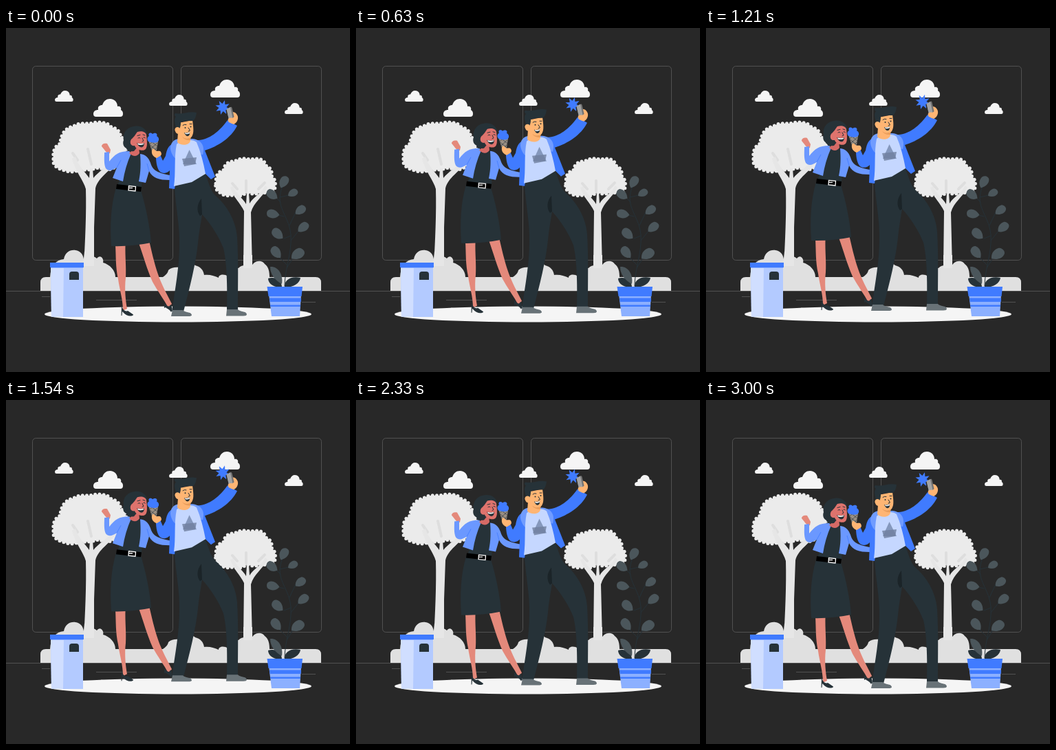
Animation of 500 by 500 pixels, one loop 3.04 s. Source, as an HTML page:

```html
<!DOCTYPE html>
<html lang="en">
<head>
<meta charset="utf-8">
<title>Selfie in the park</title>
<style>
html, body { margin: 0; width: 100%; height: 100%; overflow: hidden; background: #282828; }
svg { display: block; width: 100vw; height: 100vh; }
.line { fill: none; stroke: #5c5c5c; stroke-width: .8; }
.crown { fill: #ebebeb; stroke: #ebebeb; stroke-width: 5; stroke-linecap: round; stroke-dasharray: 0 6.2; }
.vein { fill: none; stroke: #dedede; stroke-width: 4; stroke-linecap: round; }
.trunk { fill: #e6e6e6; }
.dark { fill: #263238; }
.blue { fill: #407bff; }
.jacket { fill: #6b98ff; }
.skin { fill: #ffb573; }
.rose { fill: #e4897b; }
.ink { fill: none; stroke: #263238; stroke-linecap: round; stroke-width: 1; }
</style>
</head>
<body>
<svg viewBox="0 0 500 500">
  <defs>
    <path id="cloud" fill="#f5f5f5" d="M4 26Q0 26 0 22C0 18 3 16 7 16C6 11 9 9 13 9C15 3 19 0 24 0C31 0 35 5 35 11C39 10 41 13 40 16C43 18 43 20 43 22Q43 26 39 26Z"/>
    <path id="leaf" d="M-10 0C-6 -7 1 -8 6 -6C10 -4 11 3 7 5C2 8 -5 6 -10 0Z"/>
  </defs>

  <g class="line">
    <rect x="38.5" y="55.5" width="204" height="282" rx="5"/>
    <rect x="254.5" y="55.5" width="204" height="282" rx="5"/>
    <path d="M0 382.5H500M52 390.5H64M131 395.5H190M430 398.5H450"/>
  </g>
  <g id="clouds"></g>

  <path class="crown" d="M69 190C68 180 70 172 79 168C79 155 87 144 98 143C105 137 116 139 122 139C134 135 149 137 153 144C163 146 167 153 166 158C176 162 176 175 174 183C177 193 168 202 160 201C151 209 142 205 134 203C124 207 112 206 105 207C96 211 87 208 82 206C73 204 67 198 69 190Z"/>
  <path class="vein" d="M97 182L104 192M163 186L151 195M119 176L124 198"/>
  <path class="trunk" d="M113 348C115 310 117 270 116 234C113 222 100 207 96 190L101 187C106 202 115 209 121 218L122 204H126L127 218C134 209 146 203 157 190L161 193C151 209 134 217 130 233L128 290V348Z"/>
  <path class="crown" d="M305 226C305 217 306 209 316 207C317 199 323 193 332 194C340 188 350 190 356 191C367 188 376 191 378 200C386 203 387 211 386 215C393 220 392 231 390 235C386 243 376 239 370 239C363 243 356 241 350 239C343 245 335 245 330 243C321 245 313 243 310 238C305 236 304 231 305 226Z"/>
  <path class="vein" d="M329 226L336 234M376 225L367 234M349 222V237"/>
  <path class="trunk" d="M345 349L346 266C341 255 331 247 326 232L330 230C336 243 344 247 349 256L350 240H353L354 255C360 245 370 242 377 229L380 232C373 246 360 253 356 268L358 349Z"/>
  <path fill="#e0e0e0" d="M50 382V370Q50 362 58 362H64C65 346 72 337 84 336C86 326 93 322 101 323C108 324 112 329 113 336C118 331 127 330 132 335C137 328 143 336 141 341C151 344 159 352 159 362H228C232 359 235 357 236 352C241 347 250 347 257 349C257 342 270 340 275 345C283 347 287 352 288 359C296 358 302 360 309 363C309 358 317 357 323 361C324 352 331 348 338 349C342 344 351 344 356 348C360 338 371 336 376 343C382 347 383 355 383 362H450Q458 362 458 370V382Z"/>
  <path class="trunk" d="M112 346L114 325H128V346ZM345 349V330H358V349Z"/>
  <ellipse cx="250" cy="416" rx="194" ry="11.5" fill="#f5f5f5"/>

  <g>
    <path fill="#b3caff" d="M65 347H112V420H66Z"/>
    <path fill="#d0deff" d="M65 347H84L83 420H66Z"/>
    <path fill="#8cb0ff" d="M65 347H112V349H65Z"/>
    <path class="blue" d="M64 341H113V348H64Z"/>
    <path class="dark" d="M92 366V358Q92 354 96 354H102Q106 354 106 358V366Z"/>
  </g>

  <path class="ink" d="M405 375C405 350 416 327 414 300C412 278 397 264 398 246Q399 236 402 230M398 246L411 243M399 253L393 247M404 274L396 272M412 287L421 268M414 302L404 306M414 309L426 294M409 345L398 334M408 349L416 336"/>
  <g id="leaves" fill="#4b565b"></g>
  <path class="dark" d="M405 377C404 367 413 360 428 363C427 371 418 377 405 377ZM401 376C400 365 390 361 381 364C381 372 390 378 401 376Z"/>
  <path fill="#4b565b" d="M384 347C395 346 403 357 401 372C391 367 384 358 384 347Z"/>
  <path fill="#8cb0ff" d="M382 387H429L427 419H386Z"/>
  <path class="blue" d="M379.500 376H431L429.500 390H381.500ZM383 392.500H429L428.700 398H383.500ZM384 402.500H428.200L428 405H384.300Z"/>

  <g id="people">
    <!-- woman -->
    <path class="rose" d="M159 315H173.500C173 332 175 349 174 363C172 380 174 397 176 408L170 411C170 395 165 380 163 365C159 347 160 332 159 315ZM193 313L208 309C212 326 215 340 221 358C226 373 235 389 241 401L236 407C230 395 220 382 213 369C205 351 200 332 193 313Z"/>
    <path class="dark" d="M168 404C170 409 173 413 177 411L185 416.500Q185 418.500 180 418.500C174 418 171 414 169 412L168.500 418H167.500ZM230 400C234 404 237 407 239 402C242 405 242 411 240 413C238 409 234 408 232 406L230 407Z"/>
    <path class="dark" d="M160 232L196 236C203 259 209 287 211 312Q182 318 153 317C151 288 152 259 160 232Z"/>
    <path class="dark" d="M177 183L194 183L200 197L197 233L162 230Z"/>
    <path class="rose" d="M149 183C146 181 143 177 139 172C139 168 144 167 147 168L152 177L151 182Z"/>
    <path class="jacket" d="M143 181L150 180L150 194C158 184 164 179 179 179L182 182C176 196 172 209 170 223L155 218L161 203C155 207 149 209 145 204C142 198 143 188 143 181Z"/>
    <path class="jacket" d="M195 183C203 184 207 188 210 196C213 206 218 210 238 214V221C222 221 213 218 208 208L203 225L193 223C196 209 196 197 195 183Z"/>
    <path fill="none" stroke="#407bff" stroke-width=".8" d="M161 203L167 192M208 208L205 197"/>
    <path fill="#d56a66" d="M183 169L193 172L194 182Q188 190 179 182L183 178Z"/>
    <path class="dark" d="M186 179C178 180 176 178 175 175C171 173 169 168 171 163C169 153 176 144 186 143C195 141 204 146 205 154L195 168Z"/>
    <path fill="#de736d" d="M184 160C188 156 189 153 191 151C197 149 203 151 204 155C205 164 206 172 203 176C199 180 189 177 187 171C182 172 180 168 181 164C182 161 183 161 184 160Z"/>
    <path class="ink" d="M191 156.500L195 155.500M199 155L202 156M192 160Q194 158.500 195 160M200 159Q201.500 158 202.500 160M198 160L200 164L198 165" stroke-width=".8"/>
    <path class="dark" d="M190 167Q196 169 201 167C201 174 195 177 190 167Z"/>
    <path fill="#fff" d="M191 167.500Q196 169 200.500 167.500L200 169Q196 170.500 192 169.500Z"/>
    <path fill="#000" d="M161 227L197 231L196 238L160 234Z"/>
    <path fill="none" stroke="#fff" stroke-width="1.300" d="M178.500 229.500L188.500 230.500L188 237L178 236ZM179 232.500H184"/>

    <!-- man -->
    <path class="dark" d="M245 231L290 213C295 225 297 236 304 243C321 258 334 279 336 304C338 337 337 374 337 410H321C322 375 321 341 316 320C309 302 297 284 285 271C283 285 280 299 279 313C276 342 267 378 258 412H241C246 379 252 346 252 316C253 287 246 258 245 231Z"/>
    <path fill="#1b2428" d="M284 248C277 256 277 267 282 273L285 271Z"/>
    <path fill="#687277" d="M242 410H257C260 414 269 412 270 417Q270 419 265 419H240ZM321 409H337C340 413 349 411 350 416Q350 418.500 345 418.500H320Z"/>
    <path class="blue" d="M247 168C237 168 234 175 232 186L228 193L224 184L218 187C218 196 220 206 224 209C230 213 235 210 238 207L237 233L245 234L252 190ZM275 163C290 164 306 156 322 134L336 142C327 160 308 172 289 178L304 216L298 220L289 211L277 180Z"/>
    <path fill="#709cff" d="M253 161C244 161 239 167 239 175C240 184 245 189 248 191L270 182L286 184C290 171 283 162 271 161Z"/>
    <path fill="#c5d7ff" d="M248 169C253 163 270 160 277 166C283 180 287 196 290 212L270 224L244 230C247 211 244 189 248 169Z"/>
    <path fill="#8598bd" d="M266.500 177L277 198H257Z"/>
    <path fill="#6f7f9f" fill-opacity=".8" d="M256 190L277 188L275 198L259 201Z"/>
    <path class="skin" d="M250 152L270 154L268 162C269 171 254 172 249 166Z"/>
    <path fill="#e99d5b" d="M256 158Q262 163 268 159L268 163Q260 164 256 158Z"/>
    <path class="skin" d="M251 138L271 134C272 143 274 152 270 158C266 162 257 160 253 154C248 155 246 149 249 146Z"/>
    <path class="dark" d="M251 152L248 147C246 141 243 133 247 129C244 127 245 125 246 124C256 126 267 120 277 123C276 129 275 133 271 135C264 135 259 135 254 137C254 142 253 146 251 147Z"/>
    <path class="skin" d="M252 145C248 142 244 146 246 150C247 154 251 155 253 152Z"/>
    <path class="ink" d="M257 141.500Q259 139.500 262 140.500M267 139.500L270 139.500M265 145L267.500 149L265 150"/>
    <circle class="dark" cx="260.500" cy="145" r="1"/><circle class="dark" cx="268.500" cy="143.500" r="1"/>
    <path class="dark" d="M259 152Q264 153 267 151C268 158 262 160 259 152Z"/>
    <path fill="#fff" d="M260 152.300Q264 153.300 267 151.500V153Q263 155 260.500 153.700Z"/>

    <!-- ice cream -->
    <path fill="#9a8f83" d="M207 163L221 165L218 184L214 185Z"/>
    <path fill="none" stroke="#3d4549" stroke-width=".8" d="M208 169L219 178M210 164L220 172M211 176L217 182M220 167L211 175M220 173L213 181M214 164L209 169"/>
    <path class="blue" d="M207 165C204 161 206 158 208 157C206 153 210 151 213 154C217 151 221 154 219 157C223 159 223 164 220 166Q214 168 207 165Z"/>
    <path class="skin" d="M212 178C213 175 215 175 217 178C219 180 221 178 224 179C227 182 226 185 224 186L219 189C214 187 211 183 212 178Z"/>

    <!-- phone -->
    <polygon id="flash" class="blue"/>
    <path class="skin" d="M324 137C322 134 322 131 326 130L329 122C334 122 338 127 337 132C336 137 333 139 331 140Z"/>
    <path fill="#737373" d="M320.500 118L326 115Q328 114 328.500 116L332 131Q332 133 330 133.500L326 135Q324.500 135 324 133Z"/>
    <path fill="#a3a3a3" d="M320.500 118L326 115L330 133L326 135Q324.500 135 324 133Z"/>
    <path class="skin" d="M324 134C323 131 325 130 329 131L332 129L334 136L328 139Z"/>
  </g>
</svg>
<script>
const byId = id => document.getElementById(id);
const LOOP = 3040, CYCLE = 3000, LIFT = 10;

const clouds = [[71, 91, .62], [127, 103, 1], [237, 97, .62], [297, 75, 1], [405, 109, .62]];
byId('clouds').innerHTML = clouds.map(([x, y, s]) =>
  `<use href="#cloud" transform="translate(${x} ${y}) scale(${s})"/>`).join('');

// x, y, direction in degrees, scale
const leaves = [
  [404, 224, -62, .95], [417, 240, -30, .8], [387, 242, -142, .95],
  [388, 270, 190, .95], [428, 265, -38, .9], [395, 299, -138, 1],
  [432, 290, -40, .95], [393, 326, -128, 1], [424, 329, -35, 1.1]
];
byId('leaves').innerHTML = leaves.map(([x, y, a, s]) =>
  `<use href="#leaf" transform="translate(${x} ${y}) rotate(${a}) scale(${s})"/>`).join('');

const burst = Array.from({ length: 16 }, (_, i) => {
  const angle = i * Math.PI / 8 + .28, r = i % 2 ? 5.5 : 11;
  return [315 + r * Math.cos(angle), 115.5 + r * Math.sin(angle)].map(v => v.toFixed(1)).join();
});
byId('flash').setAttribute('points', burst.join(' '));

function draw(ms) {
  const phase = Math.min(ms % LOOP / CYCLE, 1);
  const rise = LIFT * (1 - Math.abs(1 - 2 * phase));
  byId('people').setAttribute('transform', `translate(0 ${-rise.toFixed(2)})`);
}

const start = performance.now();
function tick() {
  draw(performance.now() - start);
  requestAnimationFrame(tick);
}
draw(0);
requestAnimationFrame(tick);
</script>
</body>
</html>
```
